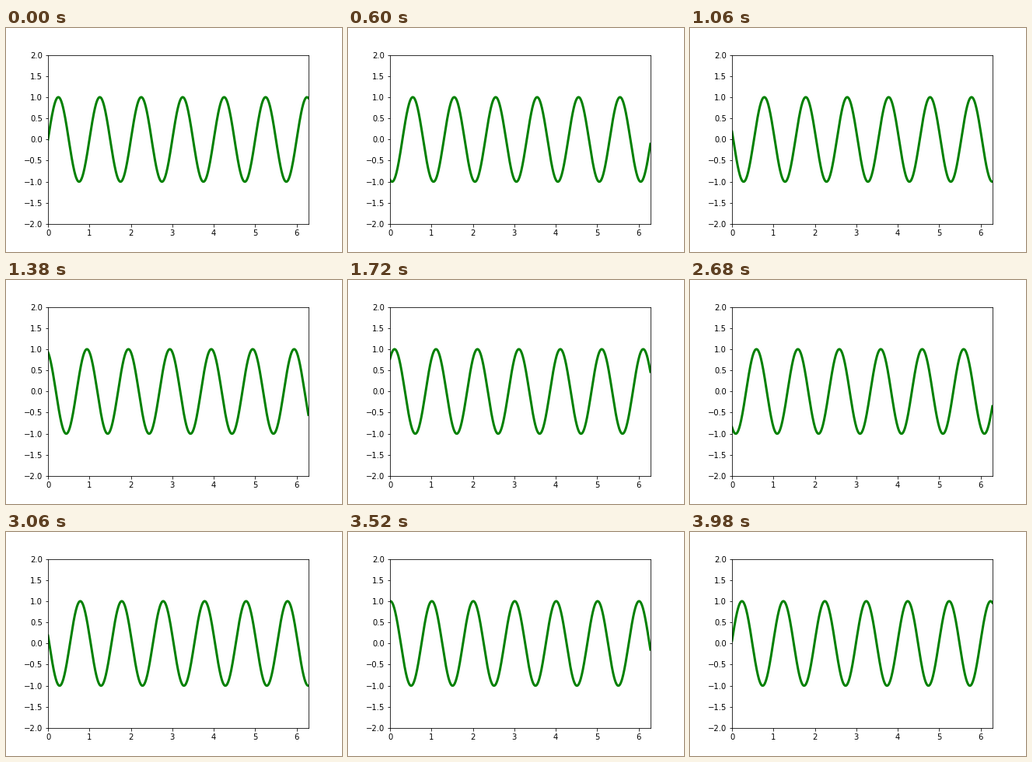
Recreate the animation shown at these times as a matplotlib script. Size 432x288 px, loop 4 s.

```python
import numpy as np
import matplotlib.pyplot as plt
from matplotlib.animation import FuncAnimation

FRAMES = 200
INTERVAL = 20  # ms
STEP = 0.01    # wave shift per frame, in periods

plt.rcParams["font.family"] = "DejaVu Sans"
plt.rcParams["font.size"] = 10

fig = plt.figure(figsize=(6, 4), dpi=72, facecolor="white")
fig.subplots_adjust(left=0.125, right=0.9, bottom=0.125, top=0.88)
ax = fig.add_subplot(xlim=(0, 2 * np.pi), ylim=(-2, 2))

x = np.linspace(0, 2 * np.pi, 1000)
line, = ax.plot(x, np.sin(2 * np.pi * x), color="green", lw=3)


def update(i):
    line.set_data(x, np.sin(2 * np.pi * (x - STEP * i)))
    return line,


anim = FuncAnimation(fig, update, frames=FRAMES, interval=INTERVAL,
                     repeat=True, repeat_delay=0, blit=False)
plt.show()
```
